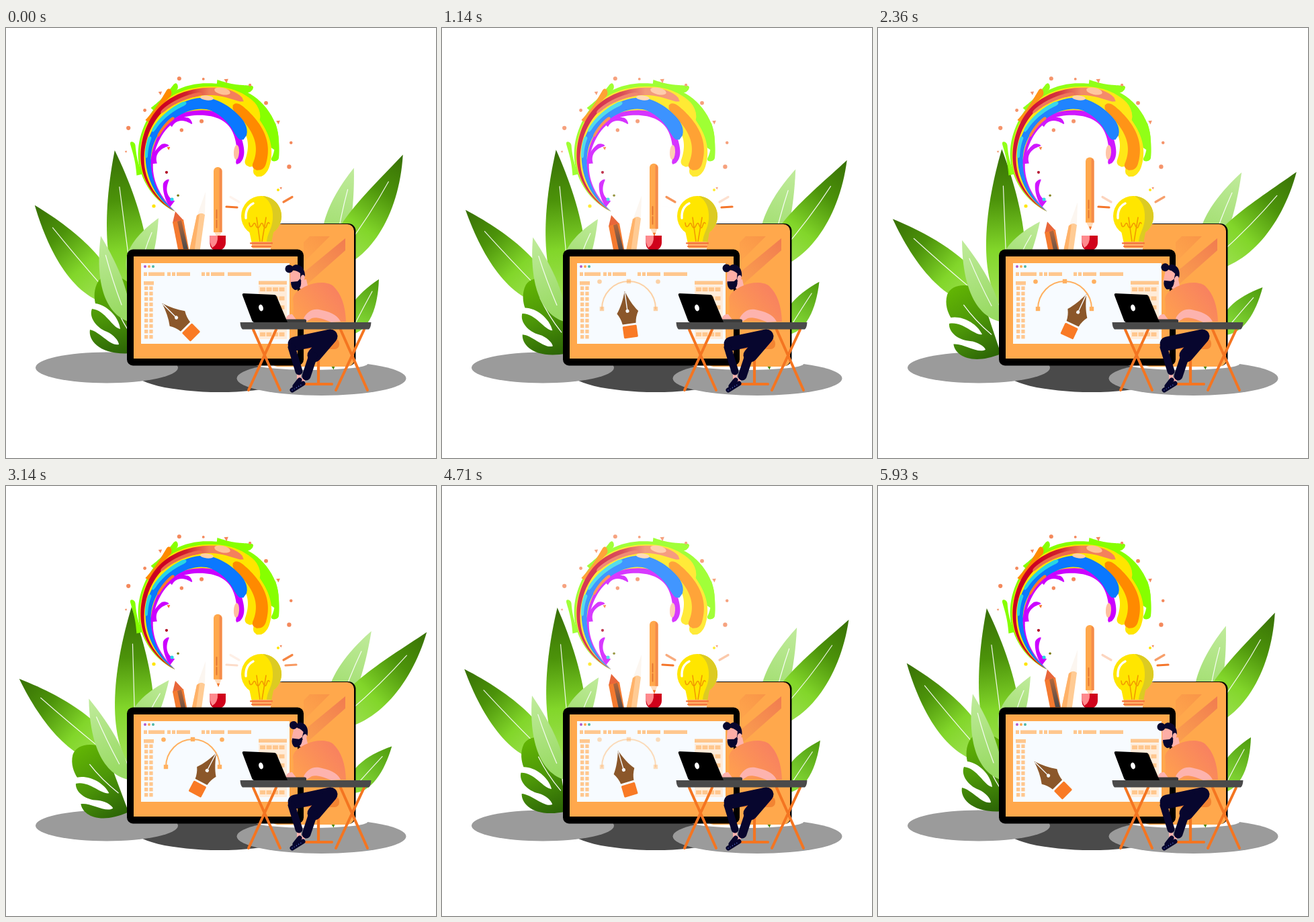
An HTML page with a canvas for the animation above (6 s loop, 640 px wide and 640 px high).

```html
<!DOCTYPE html>
<html lang="en">
<head>
<meta charset="utf-8">
<title>Designer at work</title>
<style>
html, body { margin: 0; width: 100%; height: 100%; overflow: hidden; background: #fff; }
canvas { display: block; width: 100vw; height: 100vh; }
</style>
</head>
<body>
<canvas id="stage" width="640" height="640"></canvas>
<script>
const LOOP = 6000, TAU = Math.PI * 2, RAD = Math.PI / 180;
const ctx = document.getElementById('stage').getContext('2d');
let g = ctx;

// ---------- helpers ----------
function fill(path, color) {
  g.fillStyle = color;
  g.fill(new Path2D(path));
}
function line(path, color, width) {
  g.strokeStyle = color;
  g.lineWidth = width;
  g.lineCap = g.lineJoin = 'round';
  g.stroke(new Path2D(path));
}
function rect(x, y, w, h, color, r = 0) {
  g.fillStyle = color;
  g.beginPath();
  g.roundRect(x, y, w, h, r);
  g.fill();
}
function oval(x, y, rx, ry, color, turn = 0) {
  g.fillStyle = color;
  g.beginPath();
  g.ellipse(x, y, rx, ry, turn, 0, TAU);
  g.fill();
}
const dot = (x, y, r, color) => oval(x, y, r, r, color);
const shard = (x, y, r, color) =>
  fill(`M${x - r} ${y - r * .8}L${x + r} ${y - r}L${x + r * .2} ${y + r}Z`, color);

function grad(x1, y1, x2, y2, ...colors) {
  const out = g.createLinearGradient(x1, y1, x2, y2);
  colors.forEach((c, i) => out.addColorStop(i / (colors.length - 1), c));
  return out;
}
// draws around a pivot, turned by some degrees
function at(x, y, deg, draw) {
  g.save();
  g.translate(x, y);
  g.rotate(deg * RAD);
  draw();
  g.restore();
}
const mix = (a, b, p) => a + (b - a) * p;

// ---------- paint splash: ribbons along one spiral ----------
const HUB = [300, 195], FROM = 121.6, SWEEP = 228.4;
const outerR = u => 92 + 23 * Math.sin(u * 1.9);
const bandW = u => 70 * u ** .85;
const spot = (deg, r) => [HUB[0] + r * Math.cos(deg * RAD), HUB[1] + r * Math.sin(deg * RAD)];

// edges(s) gives the outer and inner radius for s from 0 to 1
function strip(a, b, edges, color) {
  const n = 70, out = [], back = [];
  for (let i = 0; i <= n; i++) {
    const s = i / n, [r1, r2] = edges(s), deg = mix(a, b, s);
    out.push(spot(deg, r1));
    back.unshift(spot(deg, r2));
  }
  fill('M' + out.concat(back).map(q => q.join(' ')).join('L') + 'Z', color);
}
const roundEnd = s => s > .9 ? Math.sqrt(Math.max(0, 1 - ((s - .9) * 10) ** 2)) : 1;

// f1..f2 is the share of the band's width, 0 outside and 1 inside
function ribbon(f1, f2, end, color, start = 0, drift = 0) {
  strip(FROM + SWEEP * start, FROM + SWEEP * end, s => {
    const u = mix(start, end, s);
    const shift = drift * Math.max(0, u - .65) + .02 * Math.sin(u * 21 + f1 * 9);
    const half = (f2 - f1) / 2 * roundEnd(s) * (start ? roundEnd(1 - s) : 1);
    const mid = (f1 + f2) / 2 + shift;
    return [mid - half, mid + half].map(f => outerR(u) - f * bandW(u));
  }, color);
}
function drip(tip, span, r1, r2, half, color) {
  strip(tip - span, tip, s => {
    const r = mix(r1, r2, s * s), w = half * roundEnd(s) * (1.25 - .6 * Math.sin(s * Math.PI));
    return [r + w, r - w];
  }, color);
}
function paintSplash() {
  const lime = '#86ff00', yellow = '#ffe500', orange = '#ff8a00', red = '#cc0022',
    blue = '#0a78ff', purple = '#cc00ff', cyan = '#27d4e4', coral = '#f4895c';
  ribbon(0, .34, 1.01, lime);
  for (let i = 0; i < 3; i++) drip(193 + 55 * i, 26, 104 + 4 * i, 115 + 4 * i, 3.5 + i, lime);
  drip(362, 30, 108, 99, 5, lime);
  ribbon(.1, .92, .9, yellow);
  ribbon(.27, .56, 1.13, yellow, .6);
  ribbon(.5, .76, 1.09, yellow, .7);
  ribbon(.34, .6, 1.1, orange, .76);
  drip(242, 30, 103, 116, 5, orange);
  ribbon(.14, .37, .79, grad(235, 0, 336, 0, red, '#d0202c', '#f08058', '#f4805c'));
  ribbon(.28, .4, .63, '#ee6a4a', .45);
  oval(322, 94, 12, 5, '#ffc196', .2);
  ribbon(.84, 1, 1.09, purple);
  for (let i = 0; i < 3; i++) drip(153 + 47 * i, 25, 85 - 4 * i, 68 - 4 * i, 4.5, purple);
  ribbon(.48, .84, .92, blue, 0, .7);
  ribbon(.78, .9, .48, '#ff7a2a', .36);
  ribbon(.45, .6, .56, cyan, .37);
  ribbon(.44, .62, .35, cyan, .26);
  oval(299, 104, 10, 3.5, '#ffd0a4', .1);
  oval(343, 185, 4, 11, '#ffbfa0', .05);

  for (let i = 0; i < 13; i++) {
    const [x, y] = spot(185 + 16.4 * i, 122 + 5 * Math.sin(i * 2));
    (i % 3 ? dot : shard)(x, y, 1.6 + 1.6 * Math.abs(Math.sin(i * 1.3)), coral);
  }
  [coral, coral, '#f4722e', '#b00020', '#7a7a10'].forEach((c, i) =>
    (i === 2 ? shard : dot)(...spot(261 - 33 * i, 57 + .8 * i * i), 3 - .3 * i, c));
  dot(247, 255, 2.6, cyan);
  dot(220, 265, 2.6, yellow);
  dot(405, 241, 2, yellow);
}
const splash = document.createElement('canvas');
splash.width = splash.height = 640;
g = splash.getContext('2d');
paintSplash();
g = ctx;

// ---------- plants ----------
const DEEP = ['#376f05', '#4c930a', '#82d62a', '#a0e255'];
const FRESH = ['#4d9a0c', '#8be03c'];
const PALE = ['#c0eb9c', '#98da62'];

// a leaf grows from its root; left and right are the half widths
function leaf(x, y, deg, len, left, right, colors, bend = 0) {
  const l = left / .64, r = right / .64;
  at(x, y, deg, () => {
    fill(`M0 0C${-l} ${-len * .2} ${bend - l * .7} ${-len * .62} 0 ${-len}` +
      `C${bend + r * .7} ${-len * .62} ${r} ${-len * .2} 0 0Z`,
      grad(0, -len, 0, -len * .1, ...colors));
    const mid = (right - left) / 3 + bend / 2;
    line(`M${mid * .5} ${-len * .78}Q${mid} ${-len * .5} ${mid * .5} ${-len * .2}`, 'rgba(255,255,255,.9)', 1.2);
  });
}
function monstera(p) {
  at(189, 501, -19.5 * p, () => {
    g.translate(-189, -501);
    fill('M186 382C168 366 148 364 138 376C130 388 131 402 133 410C150 412 168 430 170 448C158 446 148 420 128 418C123 430 134 446 150 452C160 456 168 466 168 471C155 474 140 452 125 449C122 465 140 488 188 484Z',
      grad(145, 370, 175, 484, '#62b504', '#4c9608', '#2c6506'));
    line('M157 398Q166 425 183 452', '#fff', 1.2);
  });
}
function plants(p) {
  leaf(194, 430, -7.4 + 5.8 * p, 250, 29, 29, DEEP);
  leaf(195, 385, 17.4 + 9 * p, 107, 28, 9, PALE);
  leaf(168, 412, -40.2 - 9.7 * p, 194, 30, 23, DEEP);
  monstera(p);
  leaf(182, 437, -17.8 - 8.2 * p, 134, 22, 11, PALE);

  leaf(487, 357, 11.7 + 10.3 * p, 152, 27, 12, PALE);
  leaf(478, 362, 33 + 12.8 * p, 207, 24, 30, DEEP, 12);
  leaf(511, 457, 27.9 + 14.5 * p, 94, 18, 16, FRESH);
}

// ---------- tools behind the monitor ----------
function tools(p) {
  at(0, 17 * p, 0, () => {
    fill('M252 273L248 290L264 286Z', '#e8663a');
    fill('M248 289L264 285L276 350L260 350Z', '#f47a30');
    fill('M255 288L261 286L271 329L264 329Z', grad(0, 288, 0, 328, '#b0663c', '#4c4a4c'));
    fill('M297 244L284 280L296 278Z', '#fcf6f0');
    fill('M284 279Q290 273 296 278L286 350L269 350Z', '#ffcb94');
    fill('M284 279L288 277L278 350L269 350Z', '#ffb269');
  });
  at(0, -16.3 * p, 0, () => {
    fill('M309 302H321.5L316 315Z', '#ffdcbc');
    fill('M313.8 310H318.2L316 315.5Z', '#f4752a');
    rect(309, 207, 12.5, 97, '#ffa84c', [6, 6, 0, 0]);
    rect(317.5, 209, 4, 95, '#f58b4a', [0, 4, 0, 0]);
    line('M313.5 271V283M313.5 286V297', '#e27432', 1.8);
  });
  rect(303.5, 309, 23.5, 22.5, '#d0021b', [0, 0, 12, 10]);
  fill('M303.5 309H315Q316 322 307 327Q303 322 303.5 309Z', '#ff8a8e');
}

// ---------- bulb ----------
// each ray on the left is lit as its mirror on the right goes out
function rays(t) {
  const pulse = (period, peak) => .5 + .5 * Math.cos((t - peak) / period * TAU);
  const ray = (dx1, y1, dx2, y2, lit) => {
    for (const side of [1, -1]) {
      g.globalAlpha = side > 0 ? lit : 1 - lit;
      line(`M${380 + side * dx1} ${y1}L${380 + side * dx2} ${y2}`, '#f4752a', 3.2);
    }
    g.globalAlpha = 1;
  };
  ray(33, 259, 46, 251.5, pulse(2600, 250));
  ray(36, 267, 52, 266, pulse(2360, 1180));
}
function bulb() {
  fill('M362 302H398L394 321H366Z', '#ffe600');
  dot(380, 280, 30, '#ffe600');
  fill('M382 250A30 30 0 0 1 398 304L395 320H388C388 306 396 300 397 284C398 266 392 256 382 250Z', '#dccb22');
  line('M357 283Q356 267 368 261', '#fff', 3.5);
  line('M362 290Q363 299 367 294Q370 287 372 294Q375 301 378 294Q381 287 383 294Q386 301 388 294Q390 287 392 291M373 282L378 318M387 282L381 318', '#f29a00', 1.6);
  rect(366, 318, 29, 10, '#ffb46a', 2);
  line('M364 320.3H396M366 325H394', '#f4703a', 2.2);
}

// ---------- furniture ----------
function ground() {
  oval(318, 510, 130, 32, '#4a4a4a');
  oval(150, 505.5, 106, 23, '#9b9b9b');
  oval(469.5, 521.5, 126, 25.5, '#9b9b9b');
  oval(454, 500, 84, 9, '#fff');
}
function panel() {
  shard(487, 506, 2.5, '#4a8a10');
  rect(400, 291, 120.5, 212, '#000', 11);
  rect(394, 292, 124, 212, '#ffa84c', 10);
  fill('M452 310H482L443 349V319Z', grad(482, 310, 443, 349, '#f99548', '#ffa64c'));
  fill('M505 313V331L443 386V364Z', grad(505, 313, 443, 380, '#f17c50', '#fba04e'));
}
function monitor() {
  const peach = '#ffc78e';
  rect(180, 329.5, 263, 173, '#000', 9);
  rect(190, 340, 244, 152, '#ffa84c');
  rect(201, 350, 221, 120, '#f7fbff');
  ['#b35ac8', '#ffa84c', '#4fb8a8'].forEach((c, i) => dot(207 + 6 * i, 355, 2, c));
  const menu = (x, squares, bar) => {
    for (let i = 0; i < squares; i++) rect(x + 7 * i, 363.5, 5, 5.5, peach);
    rect(x + 7 * squares, 363.5, bar, 5.5, peach);
  };
  menu(205, 1, 24);
  menu(240, 2, 20);
  menu(291, 2, 20);
  menu(330, 0, 35);
  rect(205, 377, 15, 5.5, peach);
  for (let i = 0; i < 20; i++)
    rect(206 + i % 2 * 7.3, 384.5 + (i >> 1) * 8.05, 5.3, 5.5, peach);
  rect(376, 383, 42, 80, '#ffecd9');
  rect(376, 376.5, 42, 5.5, peach);
  for (let i = 0; i < 24; i++)
    rect(378 + i % 4 * 9.5, 386 + (i >> 2) * 13.4, 8, 6, peach);
}
function penTool(q) {
  const arch = '#ffb060';
  g.globalAlpha = Math.min(1, q * 1.1);
  line('M238 418A40 41 0 0 1 318 418', arch, 2);
  for (let i = 0; i < 3; i++) rect(234.8 + 40 * i, i === 1 ? 373.8 : 414.8, 6.4, 6.4, arch);
  dot(234.5, 377.5, 3.3, arch);
  dot(321.5, 377.5, 3.3, arch);
  g.globalAlpha = 1;
  at(mix(275.5, 285, q), mix(453, 451, q), mix(-45, 28, q), () => {
    fill('M0 -61C4 -49 9 -38 16 -29Q11 -21 10 -12H-10Q-11 -21 -16 -29C-9 -38 -4 -49 0 -61Z', '#8b572a');
    line('M0 -59V-33', '#f7fbff', 1.4);
    dot(0, -31, 2.6, '#f7fbff');
    rect(-10.5, -9, 21, 18, '#f97a25', 1.5);
  });
}

// ---------- man ----------
function legs() {
  const navy = '#07062e', skin = '#fdb3ae';
  rect(440, 462, 56, 16, '#f28433', 7);
  line('M465 476V529M446 530H485', '#f47521', 4.2);
  line('M436 512V522M446 516L441 526', skin, 6);
  line('M482 459L430 470', navy, 21);
  line('M425 475L436 511', navy, 11);
  line('M483 459L459 487', navy, 21);
  line('M457 488L447 518', navy, 13);
  line('M437 524L430 533', navy, 7);
  line('M442 529L426 539', navy, 7);
  for (let i = 0; i < 5; i++) dot(426 + i * 3.2, 539 - i * 1.9, .7, '#5a74d8');
}
function man(p) {
  const skin = '#fdb3ae', hair = '#07062e';
  legs();
  fill('M436 376L447 374L450 388Q442 394 436 386Z', skin);
  fill('M427 403C428 394 438 388 447 384C460 378 478 377 487 384C499 396 505 412 506 437L430 436C426 428 429 414 427 403Z',
    grad(430, 440, 500, 382, '#ffa24e', '#fb8f58', '#f77d62'));
  fill('M443 432C447 424 455 417 466 419C480 422 493 426 498 437L484 438C472 433 462 430 455 432L447 437Z', skin);
  fill('M416 434Q418 425 426 426L432 434Z', skin);
  at(436, 386, 13 * p, () => {
    g.translate(-436, -386);
    fill('M423 362V380H437L442 374V360Z', '#fdaea6');
    dot(421.5, 358.5, 6, hair);
    fill('M425 361C424 353 431 351 436 353C442 355 445 362 445 369L439 377C440 384 437 390 430 390Q424 387 424 378L434 377L438 373V365Q431 360 425 361Z', hair);
    oval(441.5, 372, 3, 4.5, skin, .2);
  });
}
function desk() {
  line('M368 449L408 539M402 449L361 539M498 449L538 539M533 449L491 539', '#f47521', 4);
  rect(414, 433.5, 33, 6, '#3a3a3a', 2);
  fill('M354 395L399 397Q402 397 403 400L419 438H369Q367 438 366 435L352 398Q351 395 354 395Z', '#000');
  oval(379.5, 416.5, 3.3, 5, '#fff', -.25);
  fill('M348.5 438H543.5Q543 446 540 448.5H352Q349 446 348.5 438Z', '#4a4a4a');
}

// ---------- timeline ----------
const wave = t => (1 - Math.cos(t / LOOP * TAU)) / 2;
// the pen runs ahead on the way out
const penPhase = t => wave(t + 400 * Math.max(0, Math.sin(t / LOOP * TAU)));

function draw(t) {
  const p = wave(t);
  g.fillStyle = '#fff';
  g.fillRect(0, 0, 640, 640);
  ground();
  plants(p);
  g.globalAlpha = .88 + .12 * Math.cos(t / LOOP * 2 * TAU);
  g.drawImage(splash, 0, 0);
  g.globalAlpha = 1;
  panel();
  tools(p);
  rays(t);
  bulb();
  monitor();
  penTool(penPhase(t));
  man(p);
  desk();
}
const start = performance.now();
function tick() {
  draw((performance.now() - start) % LOOP);
  requestAnimationFrame(tick);
}
tick();
</script>
</body>
</html>
```
